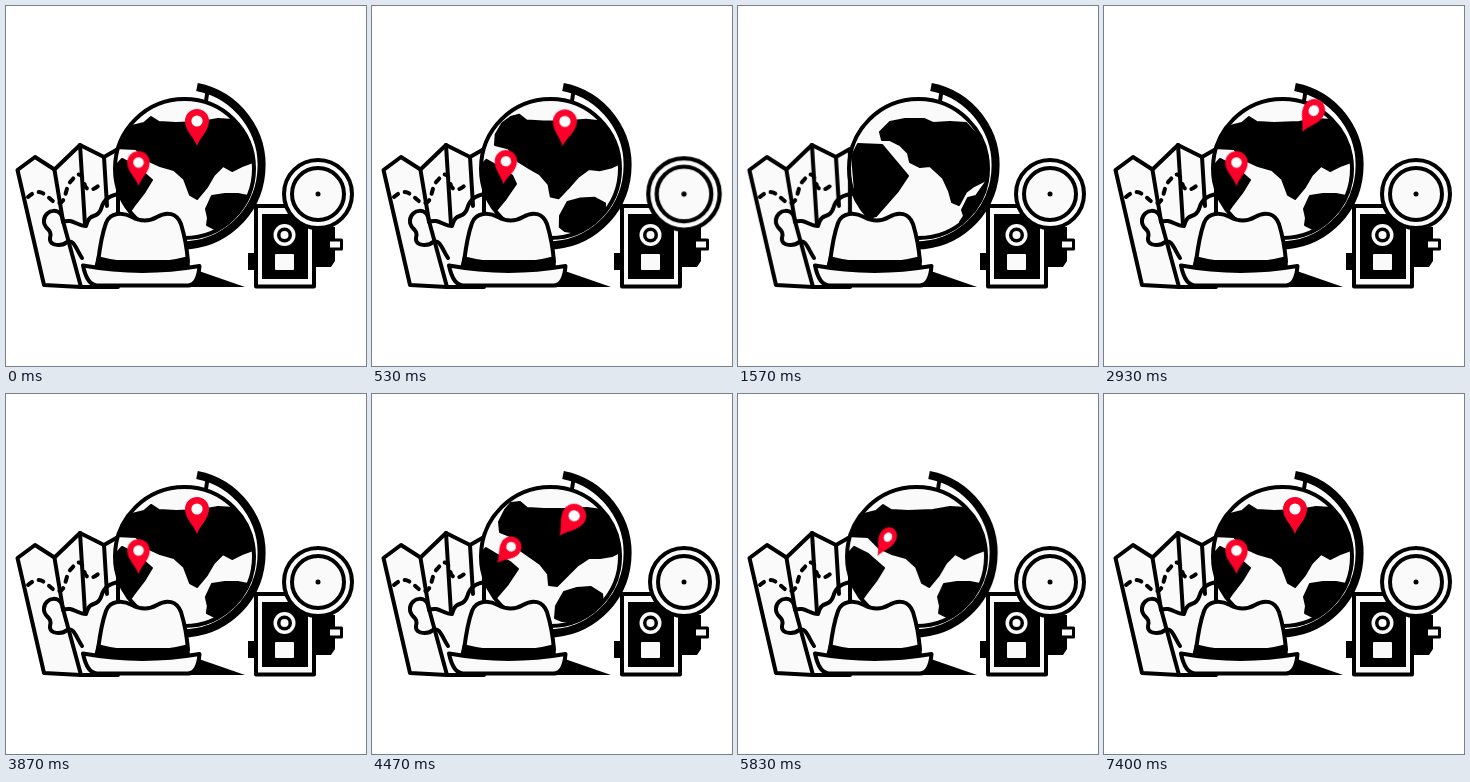
An HTML page that plays this animation: 360 px wide and 360 px high, repeating every 7430 ms.

```html
<!DOCTYPE html>
<html lang="en">
<head>
<meta charset="utf-8">
<title>Travel</title>
<style>
html, body { margin: 0; width: 100%; height: 100%; overflow: hidden; background: #fff; }
svg { display: block; width: 100vw; height: 100vh; }
.line { fill: none; stroke: #000; stroke-width: 4; stroke-linecap: round; stroke-linejoin: round; }
.paper { fill: #fafafa; }
.land { stroke: #000; stroke-width: 2; stroke-linejoin: round; }

/* two turns per 7430 ms */
.move { animation: 3715ms ease-in-out infinite; }
#globe { animation-name: sway; }
#asia { animation-name: asia; }
#west { animation-name: west; }
#south { animation-name: south; }
#pinA { animation-name: pinA; }
#pinB { animation-name: pinB; }
#map { animation-name: map; transform-origin: 75px 281px; }
#flash { animation-name: flash; transform-origin: 312px 188px; }

@keyframes sway {
  0%, 20.32%, 59%, 100% { transform: none; }
  26.11% { transform: translateX(.8px); }
  42.26% { transform: translateX(2px); }
}
@keyframes map {
  0%, 20.32%, 46%, 100% { transform: none; }
  26.11% { transform: rotate(-.6deg) scale(1.012, 1); }
}
@keyframes flash {
  0%, 4%, 20.32%, 40%, 100% { transform: none; }
  12% { transform: scale(1.06); }
  26.11% { transform: scale(1.02); }
}
@keyframes asia {
  0%, 3%, 56.93%, 100% { d: path("M108 142L114 130L122 121L138 117L145 111L153 116L170 117L195 116L212 113L228 114L241 130L250 155L236 160L226 165L217 160L208 169L201 181L191 193L184 189L178 173L168 164L154 160L141 154L130 143Z"); }
  20.32% { d: path("M128 138L127 128L133 116L139 109L148 108L155 114L172 115L195 115L215 114L230 116L242 130L250 157L240 162L228 164L217 164L205 172L195 182L185 192L177 191L176 180L168 170L158 163L148 156L138 142Z"); animation-timing-function: ease-in; }
  26.11% { d: path("M132 122L143 114L158 109L180 109L190 114L210 113L228 122L242 132L248 150L240 152L232 152L222 163L215 180L208 194L202 196L196 183L191 170L178 162L166 163L158 155L159 146L148 137L142 132L134 131Z"); animation-timing-function: ease-out; }
  42.26% { d: path("M140 126L150 116L165 113L184 113L193 117L210 116L226 117L238 130L248 152L247 170L244 175L234 180L226 186L219 199L212 196L209 185L203 172L190 160L180 161L170 156L168 147L160 139L150 134L142 134Z"); }
}
@keyframes west {
  0%, 3%, 56.93%, 100% { d: path("M108 162L116 153L130 160L146 174L138 187L128 200L121 210L110 190Z"); }
  20.32% { d: path("M108 160L114 154L124 160L138 168L146 175L136 190L124 204L110 192Z"); animation-timing-function: ease-in; }
  26.11% { d: path("M108 158L116 137L130 140L160 166L150 180L133 198L122 209L110 190Z"); animation-timing-function: ease-out; }
  42.26% { d: path("M112 150L118 138L142 139L168 170L158 185L136 210L122 214L115 185Z"); }
}
@keyframes south {
  0%, 3%, 56.93%, 100% { d: path("M200 203L206 190L219 188L232 188L242 190L238 203L232 217L220 224L209 223L201 219L202 212Z"); }
  20.32% { d: path("M184 212L192 198L205 194L219 193L230 200L231 208L228 217L216 224L202 228L190 227L183 224Z"); animation-timing-function: ease-in; }
  26.11% { d: path("M207 203L214 194L228 192L242 180L245 182L243 200L236 214L224 225L213 229L208 224L214 212Z"); animation-timing-function: ease-out; }
  42.26% { d: path("M222 204L228 192L236 190L243 180L246 176L244 190L238 205L230 213L224 217L220 216L224 210Z"); }
}
@keyframes pinA {
  0%, 12%, 86.5%, 100% { transform: translate(191px, 140px) rotate(0deg) scale(1, 1); }
  20.32% { transform: translate(187.5px, 142px) rotate(36deg) scale(1, 1); animation-timing-function: ease-in; }
  23.7% { transform: translate(186px, 143px) rotate(42deg) scale(0, 0); }
  71.5% { transform: translate(200px, 122px) rotate(36deg) scale(0, 0); animation-timing-function: ease-out; }
  78.87% { transform: translate(198px, 126px) rotate(29deg) scale(.92, .98); }
}
@keyframes pinB {
  0%, 12%, 65%, 100% { transform: translate(132.5px, 180px) rotate(0deg) scale(.94, .94); }
  20.32% { transform: translate(125px, 169px) rotate(41deg) scale(.88, .86); animation-timing-function: ease-in; }
  23.7% { transform: translate(122px, 166px) rotate(46deg) scale(0, 0); }
  52% { transform: translate(143px, 158px) rotate(36deg) scale(0, 0); animation-timing-function: ease-out; }
  56.93% { transform: translate(139.5px, 162px) rotate(29deg) scale(.72, .86); }
}
</style>
</head>
<body>
<svg viewBox="0 0 360 360">
  <defs>
    <clipPath id="disc"><circle cx="178.500" cy="162.500" r="69.500"/></clipPath>
    <g id="marker">
      <path fill="#fb0029" d="M0 0C-3-9-12-15-12-25A12 12 0 0 1 12-25C12-15 3-9 0 0Z"/>
      <circle fill="#fff" cy="-25" r="5.6"/>
    </g>
  </defs>

  <g id="map" class="move line">
    <path class="paper" d="M11.500 164L29 151L48.500 163.500L74 139L98 151L112 143V281H75L38 279Z"/>
    <path d="M48.500 164L57 215L75 281M74 139L79 219M98 151L101 200"/>
    <path d="M22 191C34 180 40 190 48 196C62 202 57 182 66 174C75 162 77 172 79 180C83 187 89 183 96 177" stroke-dasharray="5 7"/>
    <path d="M57 216C56 200 39 203 38 214C37 224 47 222 44 232C43 241 57 240 61 236C68 233 70 243 76 252M57 216C66 212 71 220 80 220M80 220C84 205 91 214 95 203C98 192 105 189 114 188"/>
  </g>

  <g id="globe" class="move">
    <path class="line" d="M191 81A80 80 0 0 1 176 239.500" style="stroke-width:8;stroke-linecap:butt"/>
    <path class="line" d="M201.500 85L200 95"/>
    <circle class="paper" cx="178.500" cy="162.500" r="69.500"/>
    <g class="land" clip-path="url(#disc)">
      <path id="asia" class="move"/>
      <path id="west" class="move"/>
      <path id="south" class="move"/>
    </g>
    <circle class="line" cx="178.500" cy="162.500" r="69.500"/>
  </g>

  <use id="pinA" class="move" href="#marker"/>
  <use id="pinB" class="move" href="#marker"/>

  <g id="hat">
    <path d="M190 264L239 281H180Z"/>
    <path class="line paper" d="M92 256C94 240 96 228 100 217C104 206 117 206 126 211Q139 218 151 211C161 205 171 207 175 218C179 231 181 243 182 256Z"/>
    <path d="M91 250Q137 262 183 250L184 262Q137 271 88 262Z"/>
    <path class="line paper" d="M77 259.500Q135 270 193.500 260Q192 279 182 279.500H91Q81 279 77 259.500Z"/>
  </g>

  <g id="camera">
    <path d="M242 247H250V264H242ZM308 221H329V255L325 261H308Z"/>
    <rect class="line paper" x="322.500" y="234" width="13" height="9" style="stroke-width:3"/>
    <rect class="line paper" x="250" y="200" width="58" height="80.500"/>
    <rect x="256" y="208" width="46" height="65"/>
    <circle class="paper" cx="278.500" cy="229" r="11"/>
    <circle cx="278.500" cy="229" r="7.500"/>
    <circle class="paper" cx="278.500" cy="229" r="4"/>
    <rect class="paper" x="269" y="248" width="19" height="16" rx="1"/>
    <g id="flash" class="move">
      <circle class="line paper" cx="312" cy="188" r="34"/>
      <circle class="line" cx="312" cy="188" r="26"/>
      <circle cx="312" cy="188" r="2.500"/>
    </g>
  </g>
</svg>
</body>
</html>
```
